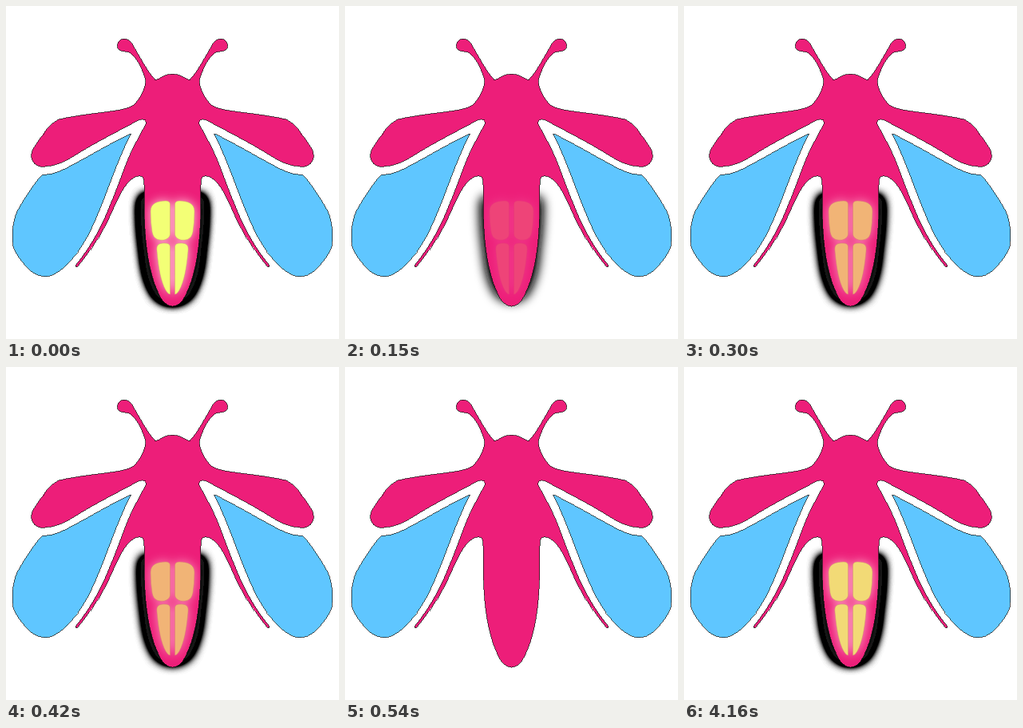
An HTML page for the animation above (4.19 s loop, 417x417 px).

```html
<!DOCTYPE html>
<html lang="en">
<head>
<meta charset="utf-8">
<title>Firefly</title>
<style>
  html, body { margin: 0; width: 100%; height: 100%; overflow: hidden; background: #fff; }
  svg { display: block; width: 100%; height: 100%; }
  .skin { stroke: #111; stroke-width: .7; shape-rendering: crispEdges; }
</style>
</head>
<body>
<svg viewBox="0 0 417 417">
  <defs>
    <path id="body" d="M209.5 85 C198 85 194 91 187 92.5
      C178 84 168 64 160.5 52 C158 45 152 40.5 147 41 C141 42 138 48 140 53 C143 58 150 56 155 58.500
      C163 64 168 74 171 82 C174 89 176 93 174 100 C172 108 166 119 159 124.500
      C147 133 105 133 66 142 C53 148 43 165 34 179 C29 189 33 199 43 201 C58 202 72 196 84 188.500
      C108 173 140 157 166 143 C172 140 177 144 175 148
      C170 157 165 167 160 176 C150 196 143 219 133 243 C122 271 110 297 87 325 Q87 328 90 326
      C104 308 116 292 127 270 C136 251 142 234 152 222 C159 214 166 211 171 214
      Q173 216 173 224 C173 252 173 277 176 302 C180 334 187 354 196 369 Q202 376 209.5 376"/>
    <path id="wing" d="M156.500 160 C130 172 108 186 85 198 C69 207 57 212 46 211
      C37 219 23 241 14 257 C8 270 7 289 9 301 C13 313 23 324 30 331 C38 338 47 340 55 338
      C73 332 91 310 105 283 C126 239 135 202 156.500 160 Z"/>
    <g id="cells">
      <path d="M205.500 248 Q205 244 200 244 C190 244 181 247 181 257 Q181 271 183 283
        C185 293 192 293.500 198 293 Q205 291 205.500 286 Z"/>
      <path d="M205.500 301 Q205 297 199 297 C191 297 188 299 189 307 C191 329 194 345 200 356 Q203 361 205.500 361 Z"/>
    </g>
    <path id="shade" d="M209.500 238 H176 Q169 239 168.500 248 C168 280 172 300 173 312 C175 332 178 345 187 361 Q196 371 209.500 371"/>
    <clipPath id="inside">
      <use href="#body"/>
      <use href="#body" transform="matrix(-1 0 0 1 417 0)"/>
    </clipPath>
    <filter id="spread" filterUnits="userSpaceOnUse" x="130" y="200" width="157" height="217">
      <feGaussianBlur stdDeviation="6.5"/>
      <feComponentTransfer><feFuncA id="gain" type="linear" slope="7"/></feComponentTransfer>
    </filter>
    <filter id="soft" filterUnits="userSpaceOnUse" x="130" y="200" width="157" height="217">
      <feGaussianBlur stdDeviation="7"/>
      <feComponentTransfer><feFuncA type="linear" slope="1.6"/></feComponentTransfer>
    </filter>
  </defs>

  <rect width="417" height="417" fill="#fff"/>
  <g filter="url(#spread)" fill="#080808" data-pair="shade"></g>
  <g class="skin" fill="#5fc6ff" data-pair="wing"></g>
  <g class="skin" fill="#ed1e79" data-pair="body"></g>
  <g id="lamp">
    <g clip-path="url(#inside)">
      <g filter="url(#soft)" fill="#ffb4cc" opacity=".75" data-pair="cells"></g>
    </g>
    <g fill="#f3ff76" stroke="#c8a568" stroke-width=".5" data-pair="cells"></g>
  </g>
</svg>
<script>
  const LOOP = 4190, STEP = 30, REST = 540, WAKE = 4040;
  const lamp = document.getElementById('lamp');
  const gain = document.getElementById('gain');

  // The insect is symmetric: draw each part and its mirror image.
  for (const g of document.querySelectorAll('[data-pair]')) {
    const use = `<use href="#${g.dataset.pair}"`;
    g.innerHTML = `${use}/>${use} transform="matrix(-1 0 0 1 417 0)"/>`;
  }

  // Triangle pulse in sixths, dark while resting.
  function level(t) {
    if (t >= WAKE) return (Math.floor((t - WAKE) / STEP) + 1) / 6;
    if (t >= REST) return 0;
    return Math.abs(Math.floor(t / STEP) % 12 - 6) / 6;
  }

  function draw(t) {
    const v = level(t);
    lamp.setAttribute('opacity', v);
    gain.setAttribute('slope', v * 7);
  }

  let start;
  function tick(now) {
    start ??= now;
    draw((now - start) % LOOP);
    requestAnimationFrame(tick);
  }
  draw(0);
  requestAnimationFrame(tick);
</script>
</body>
</html>
```
